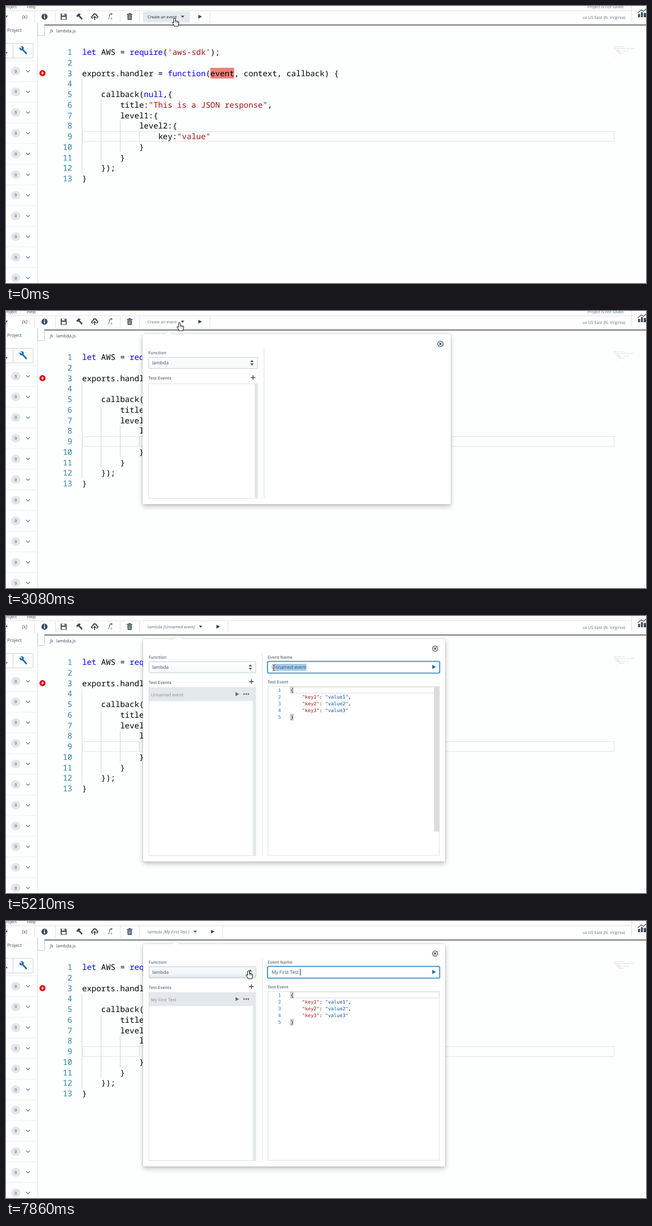
Animation, 1135 px wide and 493 px high, one loop 8 s. Source, as an HTML page:

```html
<!DOCTYPE html>
<html lang="en">
<head>
<meta charset="utf-8">
<title>Create a test event</title>
<style>
  html, body { margin: 0; width: 100%; height: 100%; overflow: hidden; background: #fdfefe; }
  svg { display: block; width: 1135px; height: 493px; font-family: "Open Sans", "Noto Sans", sans-serif; }
  text { white-space: pre; text-rendering: geometricPrecision; }
  .code { font-family: "Noto Sans Mono", "DejaVu Sans Mono", monospace; }
  .json { font-family: "DejaVu Sans Mono", monospace; }
</style>
</head>
<body>
<svg id="stage" viewBox="0 0 1135 493"></svg>
<script>
const LOOP = 8000;
const INK = '#394b59', GREY = '#5c7080', RULE = '#dde1e4';

// Markup helpers
const esc = s => s.replace(/&/g, '&amp;').replace(/</g, '&lt;');
const text = (x, y, s, size, fill = INK, extra = '') =>
  `<text x="${x}" y="${y}" font-size="${size}" fill="${fill}" ${extra}>${esc(s)}</text>`;
const rect = (x, y, w, h, fill, extra = '') =>
  `<rect x="${x}" y="${y}" width="${w}" height="${h}" fill="${fill}" ${extra}/>`;
const path = (d, fill, extra = '') => `<path d="${d}" fill="${fill}" ${extra}/>`;
const line = (d, stroke = RULE, width = 1, extra = '') =>
  path(d, 'none', `stroke="${stroke}" stroke-width="${width}" ${extra}`);
const group = (id, body, extra = '') => `<g id="${id}" ${extra}>${body}</g>`;
const move = (x, y, body) => `<g transform="translate(${x} ${y})">${body}</g>`;
const play = (x, y, fill = INK) => path(`M${x - 3} ${y - 3.6}L${x + 3.4} ${y}L${x - 3} ${y + 3.6}Z`, fill);
const label = (x, y, s) => text(x, y, s, 7.5, GREY, 'font-weight="600"');

// Colours the tokens of one line; rules are [pattern, colour] pairs
function paint(s, rules) {
  const all = new RegExp(rules.map(r => `(${r[0]})`).join('|'), 'g');
  let out = '', last = 0;
  for (const m of s.matchAll(all)) {
    const rule = rules[m.slice(1).findIndex(Boolean)];
    out += esc(s.slice(last, m.index)) + `<tspan fill="${rule[1]}">${esc(m[0])}</tspan>`;
    last = m.index + m[0].length;
  }
  return out + esc(s.slice(last));
}

function listing(lines, x, y, pitch, size, rules, cls) {
  return lines.map((s, i) => {
    const indent = s.search(/\S|$/);
    return `<text class="${cls}" x="${x + indent * size * 0.6}" y="${y + i * pitch}" font-size="${size}">` +
      paint(s.trim(), rules) + '</text>';
  }).join('');
}
const numbers = (n, x, y, pitch, size, cls) => Array.from({ length: n }, (_, i) =>
  text(x, y + i * pitch, String(i + 1), size, '#2b85a5', `class="${cls}" text-anchor="end"`)).join('');

const SOURCE = [
  "let AWS = require('aws-sdk');",
  '',
  'exports.handler = function(event, context, callback) {',
  '',
  '    callback(null,{',
  '        title:"This is a JSON response",',
  '        level1:{',
  '            level2:{',
  '                key:"value"',
  '            }',
  '        }',
  '    });',
  '}'
];
const SOURCE_RULES = [['\'[^\']*\'|"[^"]*"', '#a31515'], ['\\b(?:let|require|function|null)\\b', '#0000ff']];
const JSON_LINES = ['{', '    "key1": "value1",', '    "key2": "value2",', '    "key3": "value3"', '}'];
const JSON_RULES = [['"key\\d"', '#a31515'], ['"value\\d"', '#0451a5']];

function editor() {
  const guides = [[135, 129, 298], [168.5, 166, 279], [202.5, 204, 260], [236.5, 223, 241]];
  const code = listing(SOURCE, 135, 87, 18.75, 14.05, SOURCE_RULES, 'code');
  return rect(135.5, 223.5, 943, 17.5, 'none', 'stroke="#e2e2e2"') +
    guides.map(([x, a, b]) => line(`M${x} ${a}V${b}`, '#d6d6d6')).join('') +
    rect(362.5, 110, 42, 19, '#f07f78') +
    numbers(13, 117.5, 87, 18.75, 14.05, 'code') + code +
    `<g transform="translate(1067.3 66.3) scale(.08)" opacity=".75">${code}</g>` +
    '<circle cx="64.7" cy="119.5" r="5.4" fill="#e30613"/>' +
    path('M65.6 115.8L62.2 120.2H64.3L63.7 123.3L67.2 118.8H65.1Z', '#fff');
}

function sidebar() {
  let rows = '';
  for (let i = 0; i < 11; i++) {
    const y = 116 + i * 36.8;
    rows += rect(9, y - 7.5, 16.5, 15, '#e3e6e8', 'rx="7.5"') +
      text(17.2, y + 2.6, '0', 7.2, INK, 'text-anchor="middle"') +
      line(`M35.8 ${y - 1.7}L39 ${y + 1.5}L42.2 ${y - 1.7}`, GREY, 1.2) +
      line(`M0 ${y + 18.4}H56`, '#eceef0');
  }
  return text(2, 46.3, 'Project', 8, INK) +
    rect(-5, 66.5, 53, 26, '#fff', 'stroke="#ccd3d8" rx="2"') + line('M12.5 66.5V92.5', '#ccd3d8') +
    '<circle cx="1" cy="83" r="1.6" fill="#5c7080"/>' +
    line('M28.5 76.5L36 84.5', '#1a6fb5', 2.7, 'stroke-linecap="round"') +
    line('M24.6 74.2L27.4 77.2L29.9 74.7L27 72.4Q30.6 71.9 31 75Q30.6 78.6 27.2 78.2Q24 77.5 24.6 74.2', '#1a6fb5', 1.4) +
    line('M0 97.5H56', '#eceef0') + line('M56.2 30V493', RULE) + rows;
}

function toolbar() {
  const seps = [50.5, 87.5, 202.5, 236.5].map(x => line(`M${x} 9V29`)).join('');
  const icons =
    path('M-2 17.3H3.4L.6 20.6Z', INK) +
    text(28.5, 21.6, '(x)', 9, INK, 'font-style="italic"') +
    `<circle cx="68.3" cy="19" r="5.4" fill="${INK}"/>` + rect(67.4, 18, 1.8, 4.2, '#fff') + rect(67.4, 15.4, 1.8, 1.6, '#fff') +
    path('M97 13.5H106L107.5 15V24.5H97Z', INK) + rect(99, 13.5, 6, 3.6, '#fff') + rect(103, 14, 1.2, 2.5, INK) + rect(98.8, 19.3, 7, 4.2, '#fff') +
    path('M124.5 17.5L129 13L132.5 14.5L130.8 16.8L136 22.5L134.2 24.4L128.7 18.6L126.4 19.6Z', INK) +
    line('M154.2 21.7H153.6Q151.4 21 152 18.9Q152.7 17.3 154 17.6Q154.6 14 157.5 14Q160.6 14.3 160.7 17.3Q163 17.5 162.8 19.8Q162.2 21.6 160.2 21.7', INK, 1.8) +
    path('M157.3 17.6L160.3 21H158.2V25H156.4V21H154.3Z', INK) +
    text(182, 21.3, 'f', 9.5, INK, 'font-style="italic"') + text(185.5, 24, 'x', 6, INK) + line('M185 14.3H189M187 12.3V16.3', INK, 1) +
    rect(214.5, 14, 9.5, 1.7, INK) + rect(217.5, 12.8, 3.6, 1.3, INK) + path('M215.2 16.6H223.4L222.8 24.7H215.8Z', INK) +
    line('M217.6 18V23.2M219.3 18V23.2M221 18V23.2', '#fff', 0.7);
  const chart = path('M1121 14H1124.5V20H1121ZM1126 11H1129.5V20H1126ZM1131 12.5H1135V20H1131Z', INK) +
    line('M1120.5 12L1126.5 7L1130.5 9.5L1136 4.5', INK, 1.3);
  return rect(0, 0, 1135, 30, '#fff') + line('M0 8.5H1109') + line('M1109.5 0V28') +
    line('M56 30V52.5H68.5V34', '#c9cfd3') + line('M68 33.7H1135', '#4a4f4c', 1.4) +
    text(-4.5, 4, 'Project', 7.3, INK) + text(37, 4, 'Help', 7.3, INK) +
    text(1022.5, 22.7, 'us US East (N. Virginia)', 7.25, GREY) +
    group('unsaved', text(1031, 4.2, 'Project is not saved', 7.1, GREY)) +
    seps + icons + chart +
    text(78, 47, 'fx', 7.5, INK, 'font-style="italic"') + text(89, 47.3, 'lambda.js', 7.7, INK) +
    rect(243, 10, 83, 19, '#e4e9ec', 'id="hover"') +
    `<text id="picker" x="251" y="22.2"></text>` +
    group('tail', path('M-51 17.3H-45L-48 21Z', INK) + play(-17, 19) + line('M.5 9V29'));
}

function popup() {
  const field = (x, w, fill) => rect(x + .5, 81.5, w, 19.5, fill, 'stroke="#c3ccd2" rx="1.5"');
  const brace = y => rect(504.5, y, 5, 10.5, '#e6e6e6', 'stroke="#b9b9b9"');
  const right = label(464, 75.7, 'Event Name') + field(464, 304, '#fff') +
    group('focus', rect(464, 81, 305, 20.5, '#fff', 'stroke="#2f8fcb" stroke-width="1.6" rx="2"') +
      rect(462.8, 79.8, 307.4, 22.9, 'none', 'stroke="#137cbd" stroke-opacity=".25" rx="3"')) +
    rect(471, 85, 0, 12.5, '#a3cbee', 'id="mark"') +
    '<text id="name" x="471" y="94.2" font-size="8.3" fill="#394b59"></text>' +
    rect(520, 85, 1, 12, '#182026', 'id="caret"') +
    group('run', play(759, 90.7, 'currentColor')) +
    label(464, 120.2, 'Test Event') + rect(464.5, 125.5, 304, 300.5, '#fff', `stroke="${RULE}"`) +
    rect(504.5, 126.5, 263.5, 10.5, 'none', 'stroke="#e6e6e6" stroke-width="1.4"') +
    brace(126.5) + brace(174.8) +
    numbers(5, 487.5, 134.8, 12.05, 8.5, 'json') +
    listing(JSON_LINES, 504.7, 134.8, 12.05, 8.5, JSON_RULES, 'json') +
    rect(759, 126, 9.5, 257.5, '#dcdcdc', 'id="bar"');
  const item = rect(254, 128, 184, 23.5, '#e5e8ea') +
    '<text id="entry" x="257" y="142.7" font-size="7.75" fill="#87929a"></text>' + play(410, 139, GREY) +
    [422.2, 426, 429.8].map(x => `<circle cx="${x}" cy="139" r="1.4" fill="${GREY}"/>`).join('');
  return rect(243, 41, 536, 297, '#fff', 'id="panel" rx="3" filter="url(#shade)"') +
    group('tip', path('M-10 41.5Q-5 40.5 -2 36.6Q0 34.8 2 36.6Q5 40.5 10 41.5Z', '#fff') +
      line('M-10 41Q-5 40.3 -2 36.6Q0 34.8 2 36.6Q5 40.3 10 41', '#d5d9dc', 0.8)) +
    `<circle cx="761" cy="58" r="4.7" fill="none" stroke="${INK}" stroke-width="1.2"/>` +
    line('M759 56L763 60M763 56L759 60', INK, 1.3) +
    label(253, 75.7, 'Function') + field(253, 189.5, 'url(#soft)') +
    group('pressed', field(253, 189.5, 'url(#grey)')) +
    text(259.5, 94.2, 'lambda', 8.2, INK) + path('M430.3 89.8L433.3 86.2L436.3 89.8ZM430.3 92.2H436.3L433.3 95.8Z', INK) +
    label(253, 120.5, 'Test Events') + rect(427.5, 110, 15, 22, '#e8ebed', 'id="plus"') +
    line('M431.3 116.8H439.3M435.3 112.8V120.8', INK, 1.4) +
    rect(253.5, 127.5, 189.5, 200, '#fff', `stroke="${RULE}" id="list"`) + rect(438, 128, 5, 199, '#e3e7ea', 'id="track"') +
    line('M454.5 66V1', RULE, 1, 'id="split"') +
    group('item', item) + group('right', right);
}

const CURSORS = {
  hand: path('M-1.5 1.5Q-1.5 0 0 0Q1.5 0 1.5 1.5V5Q3 4.3 3.8 5.6Q5.2 5 5.8 6.3Q7.5 6 7.5 8V10.5L6.3 13V14.5H-.8V13L-4.2 8.8Q-4.4 7 -2.8 7.4L-1.5 8.6Z', '#fff', 'stroke="#111" stroke-width="1"') +
    line('M1.5 5V8M3.8 6V8.4M5.8 6.8V8.8', '#111', 0.8),
  arrow: path('M0 0V10.6L2.5 8.4L4.2 12.2L6 11.4L4.3 7.7H7.5Z', '#fff', 'stroke="#111" stroke-width=".9"'),
  beam: line('M-2.5 -5H-.7L0 -4.5L.7 -5H2.5M0 -4.5V4.5M-2.5 5H-.7L0 4.5L.7 5H2.5', '#111', 1)
};

document.getElementById('stage').innerHTML = `
  <defs>
    <linearGradient id="soft" x2="0" y2="1"><stop stop-color="#fff"/><stop offset="1" stop-color="#f7f9fa"/></linearGradient>
    <linearGradient id="grey" x2="0" y2="1"><stop stop-color="#f8fafb"/><stop offset=".7" stop-color="#f1f4f6"/><stop offset="1" stop-color="#dfe5e9"/></linearGradient>
    <filter id="shade" x="-10%" y="-10%" width="120%" height="125%">
      <feDropShadow dx="0" dy="0" stdDeviation=".8" flood-color="#10161a" flood-opacity=".3"/>
      <feDropShadow dx="0" dy="4" stdDeviation="4" flood-color="#10161a" flood-opacity=".22"/>
    </filter>
  </defs>` +
  rect(0, 0, 1135, 493, '#fdfefe') + editor() + sidebar() + toolbar() + group('popup', popup()) +
  '<circle id="ring" r="7" fill="#fff" fill-opacity=".55" stroke="#333" stroke-width=".9"/>' +
  Object.entries(CURSORS).map(([id, body]) => group(id, body)).join('');

// Steps: [time, ...values], each held until the next
const POINTER = [
  [0, 'hand', 299, 21.5], [1020, 'hand', 354.5, 25], [1150, 'beam', 639.5, 231.5],
  [1420, 'beam', 560, 182], [1540, 'beam', 491.5, 140.5], [1840, 'beam', 452, 112],
  [1970, 'beam', 430.5, 95.5], [2120, 'beam', 411.5, 78.5], [2260, 'beam', 385, 63],
  [2380, 'arrow', 350, 42], [2500, 'hand', 318, 25], [2630, 'hand', 307.5, 20.5],
  [3720, 'arrow', 325, 32], [3840, 'arrow', 385, 80], [3960, 'arrow', 420.5, 110.5],
  [4080, 'hand', 432, 114], [4230, 'hand', 434, 117], [4940, 'beam', 540, 94],
  [5090, 'beam', 515, 92], [5210, 'beam', 475, 92], [5330, 'beam', 446.5, 92],
  [5480, 'hand', 428, 83], [5630, 'hand', 430, 88.3]
];
const BUTTON = [[0, '#e4e9ec'], [1150, 'none'], [2630, '#e4e9ec'], [2780, '#d3d9dd'], [2930, 'none']];
const ZOOM = [[0, 0], [2930, 0.73], [3080, 1.02], [3200, 1]];
const SELECTED = [[0, 0], [5090, 0.3], [5210, 0.9], [5330, 1], [6060, 0]];
const BAR = [[0, 0], [4940, 1], [5910, 0.75], [6060, 0]];
const NAMES = [
  [0, 'Unnamed event'], [6060, 'M'], [6460, 'My'], [6580, 'My F'], [6880, 'My Fir'],
  [7000, 'My Firs'], [7150, 'My First\u00a0'], [7580, 'My First Te'], [7860, 'My First Test\u00a0']
];
const ADDED = 4660, FOCUSED = 5090;

const at = (steps, t) => steps.findLast(s => s[0] <= t).slice(1);
const $ = id => document.getElementById(id);
const set = (id, attrs) => { for (const k in attrs) $(id).setAttribute(k, attrs[k]); };
const show = (id, on) => { $(id).style.display = on ? '' : 'none'; };

function draw(t) {
  const added = t >= ADDED, focused = t >= FOCUSED;
  const [name] = at(NAMES, t), [fill] = at(BUTTON, t), [zoom] = at(ZOOM, t);

  $('picker').innerHTML = added ? `lambda <tspan font-style="italic">[${name}]</tspan>` : 'Create an event';
  set('picker', { 'font-size': added ? 7.45 : 7.1, fill: fill === 'none' ? GREY : '#202b33' });
  const end = 251 + $('picker').getComputedTextLength() + 58.3;
  set('tail', { transform: `translate(${end} 0)` });
  set('hover', { fill, width: end - 278 });
  show('unsaved', t < 3720);

  show('popup', zoom > 0);
  set('popup', { transform: `translate(289 35) scale(${zoom || 1}) translate(-289 -35)` });
  set('tip', { transform: `translate(${108.5 + end / 2} 0)` });
  const bottom = added ? 437 : 338;
  set('panel', { height: bottom - 41 });
  set('list', { height: bottom - 138 });
  set('track', { height: bottom - 139 });
  set('split', { d: `M454.5 66V${bottom - 10}` });
  show('item', added);
  show('right', added);
  show('plus', t >= 4230 && t < 4940);
  show('pressed', t >= 5480);

  $('entry').textContent = $('name').textContent = name;
  const length = added ? $('name').getComputedTextLength() : 0;
  const [part] = at(SELECTED, t);
  set('mark', { x: 471 + length * (1 - part), width: length * part });
  set('caret', { x: 471 + length });
  show('caret', t >= 6060);
  show('focus', focused);
  set('run', { color: focused ? '#106ba3' : INK });
  set('bar', { opacity: at(BAR, t)[0] });

  const [kind, x, y] = at(POINTER, t);
  for (const id in CURSORS) show(id, id === kind);
  set(kind, { transform: `translate(${x} ${y})` });
  show('ring', (t >= 2780 && t < 2930) || (t >= 4380 && t < 4510));
  set('ring', { cx: x + 1.5, cy: y + 2.5 });
}

function tick() {
  draw(performance.now() % LOOP);
  requestAnimationFrame(tick);
}
tick();
</script>
</body>
</html>
```
